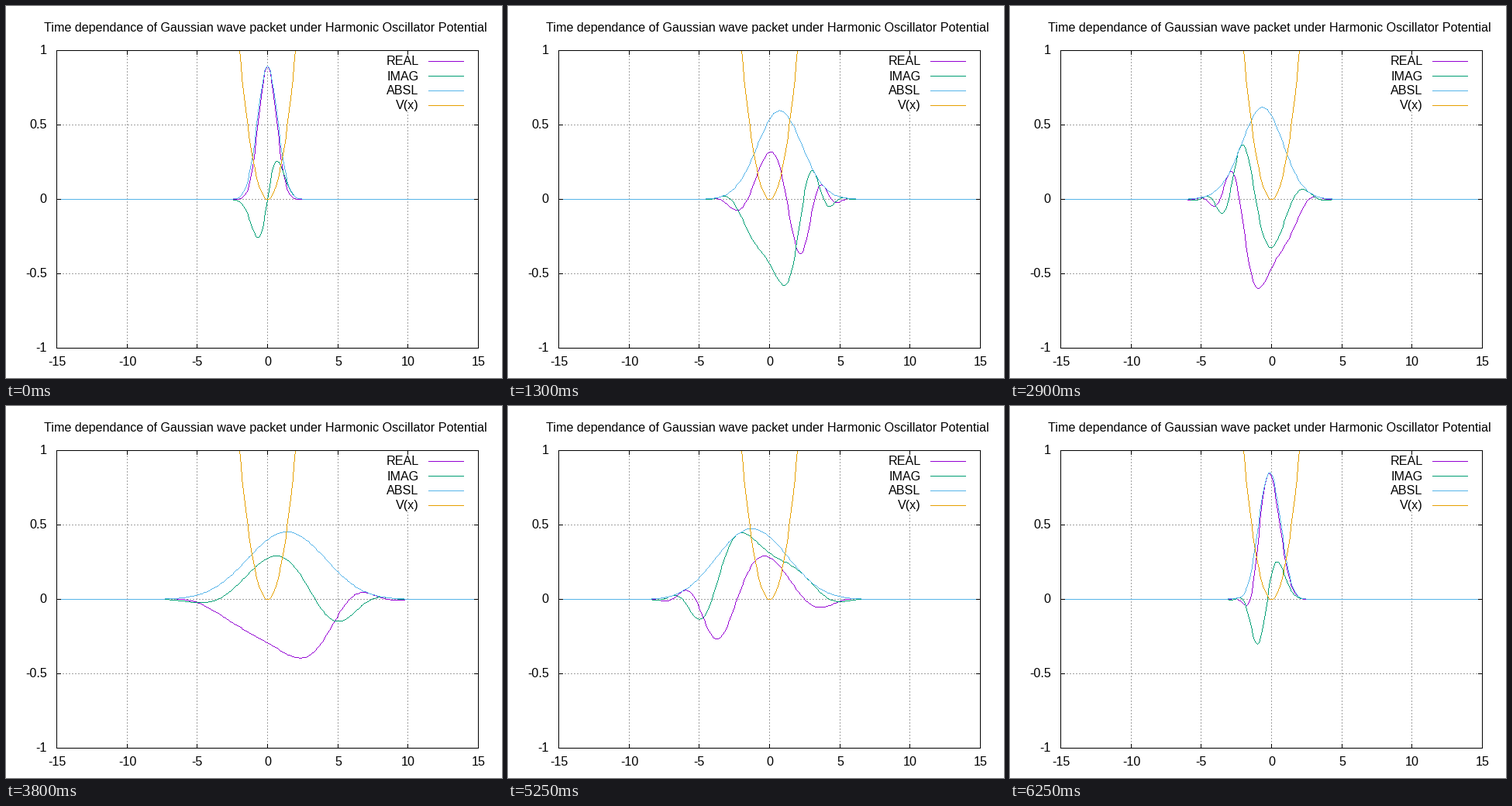
A matplotlib script that plays this animation: 640 by 480 pixels, repeating every 6300 ms.

```python
import numpy as np
import matplotlib.pyplot as plt
from matplotlib.animation import FuncAnimation
from matplotlib.colors import to_rgb

W, H, DPI = 640, 480, 100
FRAMES, INTERVAL, DT = 126, 50, 0.1
LEFT, RIGHT, TOP, BOTTOM = 65, 609, 57, 441
PURPLE, GREEN, BLUE, ORANGE, GREY = "#9400d3", "#009e73", "#56b4e9", "#e69f00", "#a0a0a0"
TITLE = "Time dependance of Gaussian wave packet under Harmonic Oscillator Potential"

plt.rcParams["font.family"] = "Liberation Sans"


def sx(x):
    return np.rint(LEFT + (np.asarray(x) + 15) * (RIGHT - LEFT) / 30)


def sy(y):
    return np.rint(BOTTOM - (np.asarray(y) + 1) * (BOTTOM - TOP) / 2)


# Finite-difference Schroedinger equation: H = -d2/dx2 + x^2/4
N, DX, K0 = 301, 0.1, 0.7
x = (np.arange(N) - N // 2) * DX
ham = np.diag(2 / DX**2 + x**2 / 4) - (np.eye(N, k=1) + np.eye(N, k=-1)) / DX**2
energy, modes = np.linalg.eigh(ham)
coef = modes.T @ ((2 / np.pi) ** 0.25 * np.exp(-x**2 + 1j * K0 * x))


def psi(t):
    return modes @ (coef * np.exp(-1j * energy * t))


def stroke(img, xs, ys, color, dotted=False):
    """Draw a one-pixel polyline without antialiasing."""
    xs, ys = np.asarray(xs, float), np.asarray(ys, float)
    dx, dy = np.diff(xs), np.diff(ys)
    steps = np.maximum(abs(dx), abs(dy)).astype(int)
    seg = np.repeat(np.arange(len(steps)), steps)
    f = (np.arange(steps.sum()) - (np.cumsum(steps) - steps)[seg]) / steps[seg]
    px = np.append(xs[seg] + dx[seg] * f, xs[-1])
    py = np.append(ys[seg] + dy[seg] * f, ys[-1])
    px, py = (np.floor(p + 0.5).astype(int) for p in (px, py))
    if dotted:
        on = np.arange(len(px)) % 4 < 2
        px, py = px[on], py[on]
    img[py, px] = np.rint(np.multiply(to_rgb(color), 255))


fig = plt.figure(figsize=(W / DPI, H / DPI), dpi=DPI, facecolor="white")
ax = fig.add_axes([0, 0, 1, 1])
ax.axis("off")


def label(px, py, text, ha, size=16.12):
    ax.text(px, py, text, ha=ha, va="baseline", fontsize=size * 72 / DPI)


# Grid and labels
base = np.full((H, W, 3), 255, np.uint8)
for v in range(-15, 16, 5):
    if abs(v) < 15:
        stroke(base, [sx(v)] * 2, [BOTTOM, 137 if v == 10 else TOP], GREY, dotted=True)
    label(sx(v), 464, str(v), "center")
for v in (-1, -0.5, 0, 0.5, 1):
    if abs(v) < 1:
        stroke(base, [LEFT, RIGHT], [sy(v)] * 2, GREY, dotted=True)
    label(52, sy(v) + 4, f"{v:g}", "right")
label(334.5, 33, TITLE, "center")

# Key
for i, (name, color) in enumerate([("REAL", PURPLE), ("IMAG", GREEN),
                                   ("ABSL", BLUE), ("V(x)", ORANGE)]):
    label(532, 76 + 19 * i, name, "right")
    stroke(base, [545, 590], [71 + 19 * i] * 2, color)


def draw_frame(img):
    for v in range(-15, 16, 5):
        stroke(img, [sx(v)] * 2, [BOTTOM, BOTTOM - 5], "black")
        stroke(img, [sx(v)] * 2, [TOP, TOP + 5], "black")
    for v in (-1, -0.5, 0, 0.5, 1):
        stroke(img, [LEFT, LEFT + 5], [sy(v)] * 2, "black")
        stroke(img, [RIGHT, RIGHT - 5], [sy(v)] * 2, "black")
    stroke(img, [LEFT, RIGHT, RIGHT, LEFT, LEFT], [TOP, TOP, BOTTOM, BOTTOM, TOP], "black")


well = np.abs(x) < 2 + DX / 2
screen = ax.imshow(base, extent=(-0.5, W - 0.5, H - 0.5, -0.5),
                   interpolation="nearest", aspect="auto")


def update(n):
    img = base.copy()
    w = psi(n * DT)
    for values, color in ((w.real, PURPLE), (w.imag, GREEN), (np.abs(w), BLUE)):
        stroke(img, sx(x), sy(values), color)
    stroke(img, sx(x[well]), sy(x[well] ** 2 / 4), ORANGE)
    draw_frame(img)
    screen.set_data(img)
    return [screen]


anim = FuncAnimation(fig, update, frames=FRAMES, interval=INTERVAL, repeat=True,
                     repeat_delay=0, blit=False)
plt.show()
```
